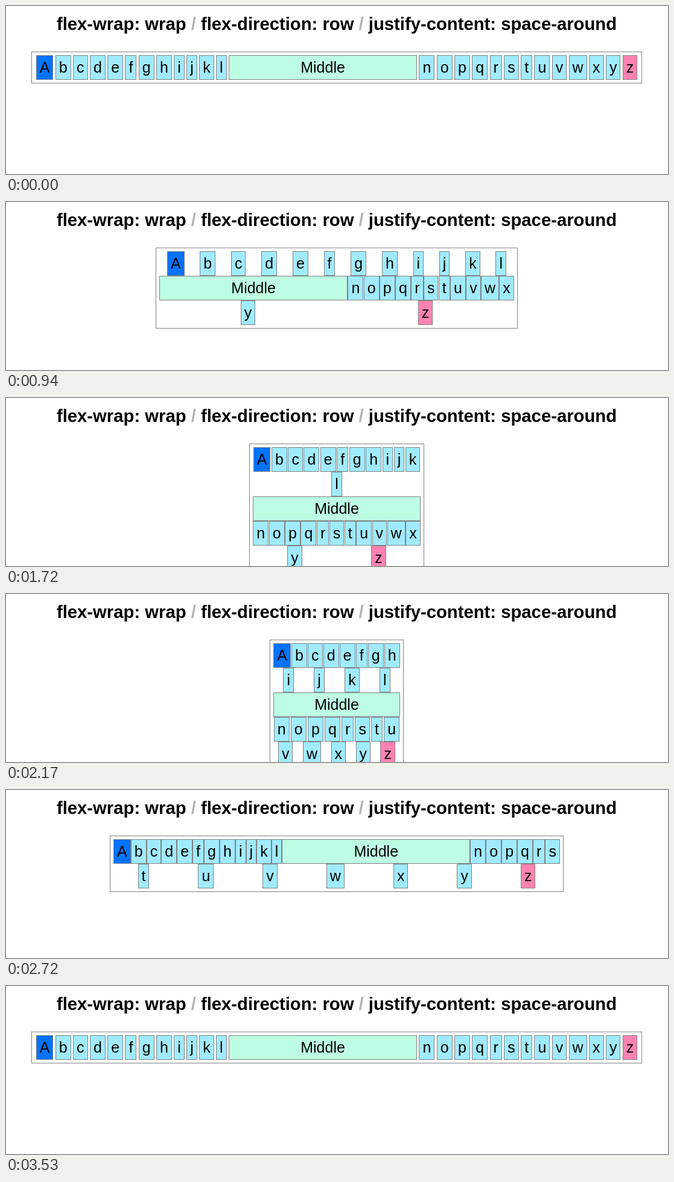
Animation of 1097x280 px, one loop 3940 ms. Source, as an HTML page:

```html
<!DOCTYPE html>
<html lang="en">
<head>
<meta charset="utf-8">
<title>Flex wrap</title>
<style>
  html, body { margin: 0; width: 100%; height: 100%; overflow: hidden; background: #fff; }
  body { position: relative; font: 25px "Liberation Sans", Arial, sans-serif; color: #000; }
  h3 {
    position: absolute; left: 0; top: 14px; width: 1096px; margin: 0;
    font-size: 29.25px; line-height: 32px; text-align: center; white-space: nowrap;
  }
  h3 span { color: #b3b3b3; }
  #box {
    position: absolute; top: 76px; box-sizing: border-box;
    display: flex; flex-flow: row wrap; justify-content: space-around;
    padding: 5px; border: 1px solid gray;
  }
  #box div { padding: 5px; border: 1px solid gray; line-height: 29px; text-align: center; background: #a0ebff; }
  #box .first { background: #0073ff; }
  #box .middle { width: 300px; background: #bdfde3; }
  #box .last { background: #ff82b2; }
</style>
</head>
<body>
<h3>flex-wrap: wrap <span>/</span> flex-direction: row <span>/</span> justify-content: space-around</h3>
<div id="box"></div>
<script>
const LOOP = 3940, CENTER = 548, REST = 30, PAUSE = 100;
const box = document.getElementById('box');

for (const c of 'Abcdefghijklmnopqrstuvwxyz') {
  const item = document.createElement('div');
  item.textContent = c === 'm' ? 'Middle' : c;
  item.className = { A: 'first', m: 'middle', z: 'last' }[c] || '';
  box.append(item);
}

// The drag: time, box width, and how long the picture rests there
const drag = [
  [150, 1012], [420, 830, PAUSE], [690, 698], [940, 600], [1180, 496, PAUSE],
  [1410, 422.6], [1720, 290, PAUSE], [2170, 222.5], [2340, 262],
  [2720, 752, PAUSE], [2880, 1006], [3120, 840], [3530, 1012]
];

function widthAt(t) {
  const next = drag.findIndex(([time]) => time > t);
  if (next < 1) return drag[0][1]; // the drag ends at the width it began with
  const [t0, w0, rest = REST] = drag[next - 1];
  const [t1, w1] = drag[next];
  return t - t0 < rest ? w0 : w0 + (w1 - w0) * (t - t0) / (t1 - t0);
}

let start;
function draw(now) {
  start ??= now;
  const width = widthAt((now - start) % LOOP);
  box.style.left = CENTER - width / 2 + 'px';
  box.style.width = width + 'px';
  requestAnimationFrame(draw);
}
requestAnimationFrame(draw);
</script>
</body>
</html>
```
